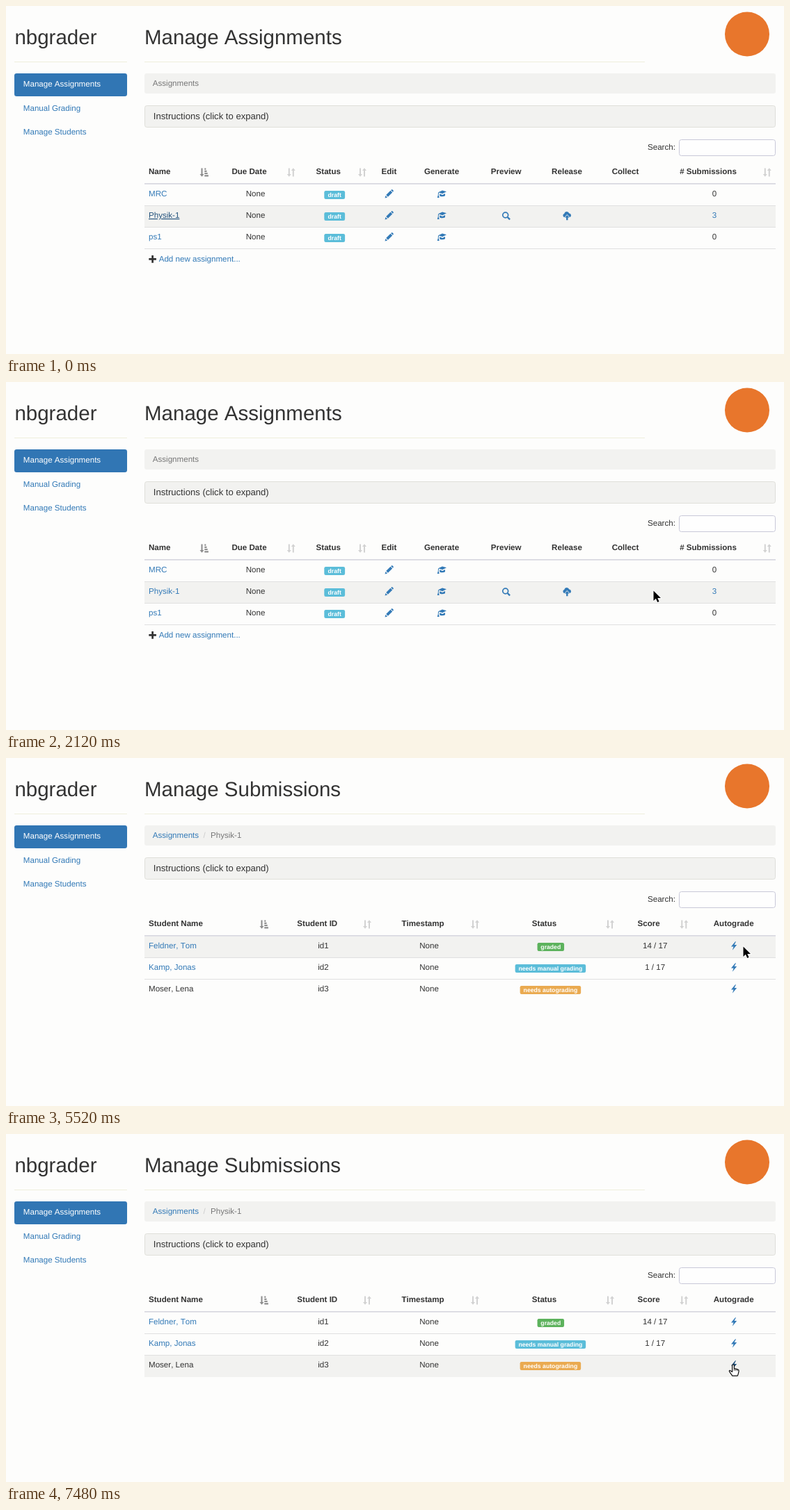
Animation, 1118 px wide and 501 px high, one loop 8 s. Source, as an HTML page:

```html
<!DOCTYPE html>
<html lang="en">
<head>
<meta charset="utf-8">
<title>nbgrader</title>
<style>
  html, body { margin: 0; width: 100%; height: 100%; overflow: hidden; background: #fdfdfc; }
  svg { display: block; }
  text {
    font: 11.58px "Liberation Sans", Arial, sans-serif; fill: #333;
    text-rendering: geometricPrecision; font-kerning: none;
  }
  .h1 { font-size: 29.5px; }
  .h4 { font-size: 13.1px; }
  .bold { font-weight: bold; }
  .mid { text-anchor: middle; }
  .link { fill: #337ab7; }
  .link.on { fill: #23527c; text-decoration: underline; }
  .muted { fill: #777; }
  .faint { fill: #ccc; }
  .white { fill: #fff; }
  .badge { font-size: 8.68px; font-weight: bold; fill: #fff; text-anchor: middle; }
</style>
</head>
<body>
<svg id="stage" width="1118" height="501" viewBox="0 0 1118 501"></svg>
<script>
const LOOP = 8000, STEP = 40;
const ROW_TOP = 257, ROW_H = 31;
const rowTop = i => ROW_TOP + i * ROW_H;
const rowMid = i => rowTop(i) + 13.5;
const rowBase = i => rowTop(i) + 17;

const icons = {
  pencil: '<path d="M-6 6l1-3.6 2.6 2.6zM-4.3 1.6L2-4.7 4.7-2-1.6 4.3zM2.7-5.3l1-1q.5-.4 1 0L6.2-4.7q.4.5 0 1l-.8 1z"/>',
  cap: '<path d="M-5-2.2L1-5 7-3.2 1.2-.2zM-2.8-.3L1.2 1.4 5-.6V2.8Q1.5 4.8-2.8 3zM-5-2.2l1 .8L-4.3 2l1 3.4h-3l1.1-3.4z"/>',
  lens: '<g fill="none" stroke="#337ab7"><circle cx="-1" cy="-1" r="3.9" stroke-width="1.7"/><path d="M2 2l3.4 3.4" stroke-width="2.3"/></g>',
  cloud: '<path d="M-3.5 2.3a2.8 2.8 0 0 1-.6-5.4A3.7 3.7 0 0 1 3-3.4 2.9 2.9 0 0 1 3.6 2.3z"/><path d="M0-1l3.3 3.6H1.2V6.2h-2.4V2.6h-2.1z" stroke="#f2f2f0" stroke-width="1.4" paint-order="stroke"/>',
  bolt: '<path d="M2-6.3L-4 .9H-.5L-2.2 6.3 4.2-1.5H.6L3-6.3z"/>',
  sort: '<path fill="#d2d2d2" d="M-4-6h2V2.5H0L-3 6.3-6 2.5h2zM2 6h2V-2.5H6L3-6.3 0-2.5h2z"/>',
  sorted: '<path fill="#8c8c8c" d="M-4-6h2V2.5H0L-3 6.3-6 2.5h2zM.8-6h2v2.2h-2zM.8-2.8h3.2v2.2H.8zM.8.4h4.4v2.2H.8zM.8 3.7h5.6v2.2H.8z"/>'
};

const text = (x, y, s, cls = '', id = '') =>
  `<text x="${x}" y="${y}" class="${cls}"${id && ` id="${id}"`}>${s}</text>`;
const rect = (x, y, w, h, fill, more = '') =>
  `<rect x="${x}" y="${y}" width="${w}" height="${h}" fill="${fill}" ${more}/>`;
const icon = (name, x, y, id = '') =>
  `<g class="link"${id && ` id="${id}"`} transform="translate(${x} ${y})">${icons[name]}</g>`;
const rule = (y, h = 1, color = '#e0e0e0') => rect(199, y, 907, h, color);
const heads = (list, y) => list.map(([x, s]) => text(x, y, s, 'bold mid')).join('');
const sorts = list => list.map(x => icon('sort', x, 239.5)).join('');
const badge = (x, row, w, s, color) =>
  rect(x - w / 2, rowTop(row) + 9, w, 12, color, 'rx="2.2"') +
  text(x, rowTop(row) + 17.6, s, 'badge');

const search = text(922, 207, 'Search:') +
  rect(967.5, 192.5, 138, 23, '#fefefe', 'rx="3" stroke="#c8c8d8"');
const headRule = rule(255, 1.7, '#d8d8e0');

const frame =
  text(12.4, 55, 'nbgrader', 'h1') +
  rect(12, 80, 162, 1, '#eeeedc') + rect(199, 80, 719, 1, '#eeeedc') +
  '<circle cx="1065" cy="40.5" r="32" fill="#e8762c"/>' +
  rect(12, 97, 162, 33, '#3176b4', 'rx="3.3"') +
  text(24.8, 116, 'Manage Assignments', 'white') +
  text(24.8, 151, 'Manual Grading', 'link') +
  text(24.8, 185, 'Manage Students', 'link') +
  rect(199, 97, 907, 29, '#f2f2f0', 'rx="3.3"') +
  rect(199.5, 143.5, 906, 31, '#f2f2f0', 'rx="3" stroke="#dfdfda"') +
  text(211.8, 163, 'Instructions (click to expand)', 'h4');

function assignments() {
  const names = ['MRC', 'Physik-1', 'ps1'];
  const rows = names.map((name, i) =>
    text(205, rowBase(i), name, 'link', i === 1 ? 'nameLink' : '') +
    text(358.5, rowBase(i), 'None', 'mid') +
    badge(472.2, i, 29.8, 'draft', '#5bbdd9') +
    icon('pencil', 550.5, rowMid(i)) + icon('cap', 626, rowMid(i)) +
    text(1018, rowBase(i), i === 1 ? 3 : 0, i === 1 ? 'mid link' : 'mid', i === 1 ? 'countLink' : '') +
    rule(rowTop(i + 1) - 1));
  return text(199, 55, 'Manage Assignments', 'h1') +
    text(210.8, 115, 'Assignments', 'muted') + search +
    text(205, 242, 'Name', 'bold') +
    heads([[349.5, 'Due Date'], [463.3, 'Status'], [550.5, 'Edit'], [626, 'Generate'],
      [718.7, 'Preview'], [806, 'Release'], [890, 'Collect'], [1009, '# Submissions']], 242) +
    icon('sorted', 284.5, 239.5) + sorts([409.8, 512, 1093.8]) + headRule + rows.join('') +
    icon('lens', 718.7, rowMid(1) + 0.5) + icon('cloud', 806.3, rowMid(1) + 0.5) +
    '<path d="M205.3 364.4h10.6M210.6 359.1v10.6" stroke="#333" stroke-width="2.7"/>' +
    text(219.7, 368, 'Add new assignment...', 'link');
}

const submissionsTop = text(199, 55, 'Manage Submissions', 'h1') +
  text(210.8, 115, 'Assignments', 'link') + text(283.6, 115, '/', 'faint') +
  text(294, 115, 'Physik-1', 'muted');

const loading = () => submissionsTop +
  text(205, 209, 'Student Name', 'bold') +
  heads([[537, 'Student ID'], [686.7, 'Timestamp'], [813.6, 'Status'], [911, 'Score'], [1031.7, 'Autograde']], 209) +
  rule(221, 1.7, '#deded2') + text(205, 240, 'Loading, please wait...');

function submissions() {
  const students = [
    ['Feldner, Tom', '14 / 17', 782.8, 38.5, 'graded', '#5cb25c'],
    ['Kamp, Jonas', '1 / 17', 782.4, 101.5, 'needs manual grading', '#5bbdd9'],
    ['Moser, Lena', '', 782.4, 87.5, 'needs autograding', '#eaaa50']
  ];
  const rows = students.map(([name, score, x, w, state, color], i) =>
    text(205, rowBase(i), name, score ? 'link' : '') +
    text(456, rowBase(i), 'id' + (i + 1), 'mid') +
    text(608, rowBase(i), 'None', 'mid') +
    badge(x, i, w, state, color) +
    text(932.7, rowBase(i), score, 'mid') +
    icon('bolt', 1046, rowMid(i), 'bolt' + i) +
    (i < 2 ? rule(rowTop(i + 1) - 1) : ''));
  return submissionsTop + search + text(205, 242, 'Student Name', 'bold') +
    heads([[447.3, 'Student ID'], [599, 'Timestamp'], [773.5, 'Status'], [923.7, 'Score'], [1045.7, 'Autograde']], 242) +
    icon('sorted', 370.5, 239.5) + sorts([519, 674, 868, 974.3]) + headRule + rows.join('');
}

const $ = id => document.getElementById(id);
$('stage').innerHTML = rect(0, 0, 1118, 501, '#fdfdfc') + frame +
  `<g id="hover">${rect(199, ROW_TOP, 907, ROW_H, '#f2f2f0')}</g>` +
  `<g id="assignments">${assignments()}</g>` +
  `<g id="loading">${loading()}</g>` +
  `<g id="submissions">${submissions()}</g>` +
  `<g id="cursor">
    <path id="arrow" transform="translate(-.5 -1)" d="M0 0V14.5l3.4-3.2 2.3 5.2 2.4-1-2.3-5.1h4.7z" stroke="#fff" stroke-width="1.6" paint-order="stroke"/>
    <g id="hand" stroke="#111" stroke-linejoin="round">
      <path fill="#fff" stroke-width="1.2" d="M-1.4 .9a1.4 1.4 0 0 1 2.8 0V5.2l5 1.2q1.9.5 1.7 2.4l-.9 4.2-1 2.6H-1.2l-4.2-6q-.8-1.8.9-1.7l3.1 2z"/>
      <path fill="none" stroke-width=".8" d="M1.4 5v3.4M3.7 5.8v2.8M6 6.4v2.4"/>
    </g>
  </g>`;

// Pointer path: time, x, y
const path = [
  [1240, 226, 302], [1520, 445, 321], [1640, 547, 319], [2120, 931, 301.5], [2480, 990, 304],
  [2880, 1016, 299], [2960, 1016, 299], [3160, 1019, 298.5], [3600, 1019, 298.5],
  [3840, 1030, 311], [4120, 1030, 311], [4280, 1034, 315], [4400, 1034, 315],
  [4800, 1058, 333], [4920, 1058, 333], [5040, 1060, 335], [5320, 1060, 335],
  [5520, 1060, 272.5], [5840, 1060, 276], [6160, 1061, 304], [6720, 1061, 343],
  [6880, 1061, 343], [7480, 1045, 332.5]
];

function pointer(t) {
  const i = path.findIndex(p => p[0] > t);
  if (i < 0) return path[path.length - 1].slice(1);
  if (i === 0) return path[0].slice(1);
  const [t0, x0, y0] = path[i - 1], [t1, x1, y1] = path[i];
  const k = (t - t0) / (t1 - t0);
  return [x0 + (x1 - x0) * k, y0 + (y1 - y0) * k];
}

const show = (id, on) => { $(id).style.display = on ? '' : 'none'; };

function draw(time) {
  const t = Math.floor(time % LOOP / STEP) * STEP;
  const view = t < 3440 ? 'assignments' : t < 3480 ? 'loading' : 'submissions';
  const [x, y] = pointer(t);
  const stale = t >= 3440 && t < 3640; // hover waits for the next pointer move
  const row = Math.max(0, Math.min(2, Math.floor((y - ROW_TOP + 0.5) / ROW_H)));
  const onName = view === 'assignments' && row === 1 && x < 250;
  const onCount = view === 'assignments' && row === 1 && x > 1012;
  const onBolt = view === 'submissions' && !stale && Math.abs(x - 1046) < 5 && Math.abs(y - rowMid(row)) < 8;
  const hand = onName || onCount || onBolt || stale;

  for (const id of ['assignments', 'loading', 'submissions']) show(id, id === view);
  show('hover', !stale);
  $('hover').setAttribute('transform', `translate(0 ${row * ROW_H})`);
  $('nameLink').classList.toggle('on', onName);
  $('countLink').classList.toggle('on', onCount);
  for (let i = 0; i < 3; i++) $('bolt' + i).classList.toggle('on', onBolt && i === row);
  show('cursor', t >= 1280);
  show('hand', hand);
  show('arrow', !hand);
  $('cursor').setAttribute('transform', `translate(${x} ${y})`);
}

const start = performance.now();
function tick() {
  draw(performance.now() - start);
  requestAnimationFrame(tick);
}
tick();
</script>
</body>
</html>
```
